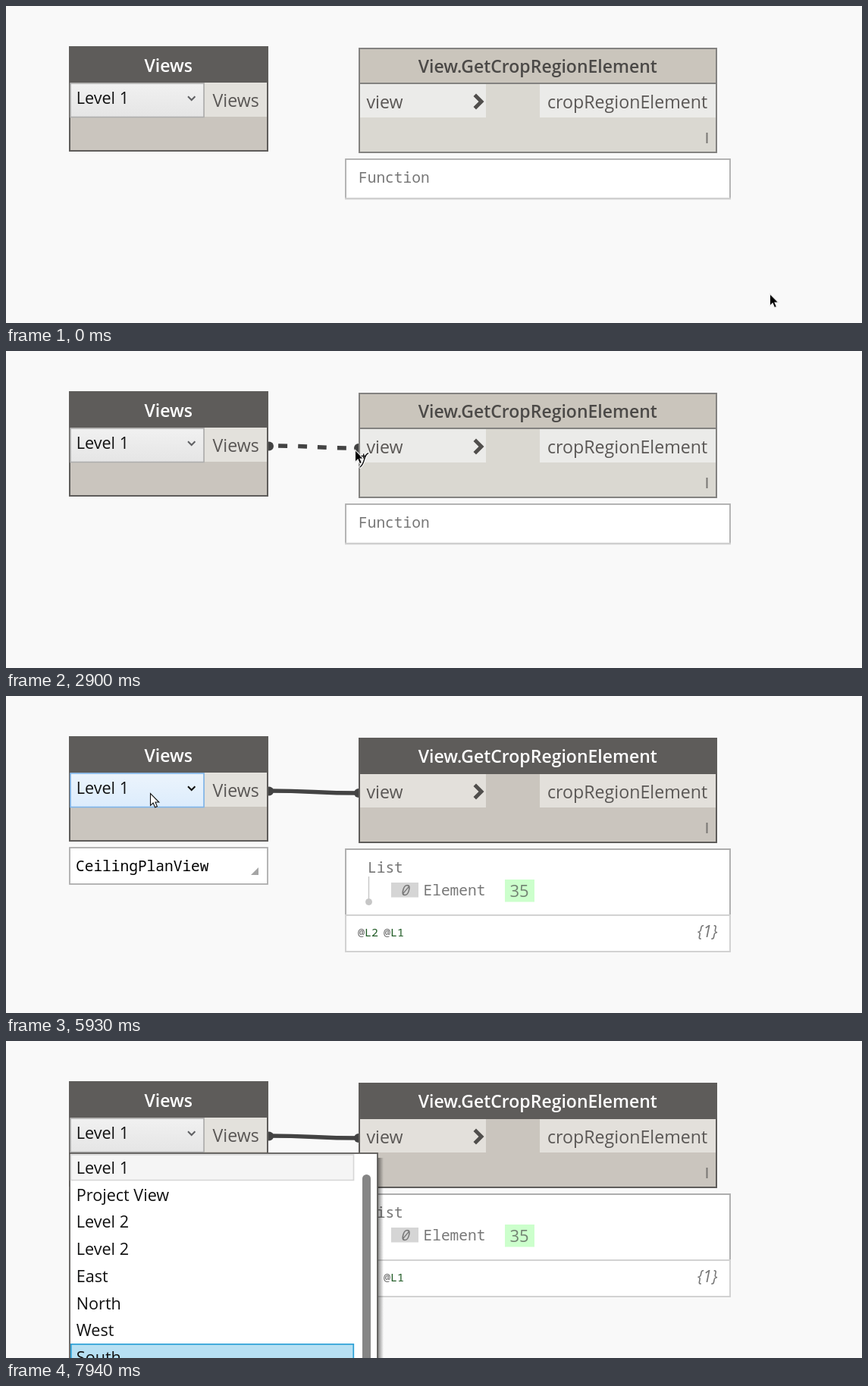
Write an HTML page that moves like this. It is 1129 by 418 pixels and loops after 8 s.

```html
<!DOCTYPE html>
<html lang="en">
<head>
<meta charset="utf-8">
<title>Crop region node graph</title>
<style>
  html, body { margin: 0; width: 100%; height: 100%; overflow: hidden; background: #f9f9f9; }
  svg { display: block; width: 100%; height: 100%; }
  text { font-family: "Open Sans", sans-serif; font-size: 23.2px; fill: #5a5755; white-space: pre; }
  .title { font-weight: 600; font-size: 23px; text-anchor: middle; fill: #fff; }
  .mono { font-family: "Noto Sans Mono", monospace; font-size: 19.5px; fill: #777; }
  .item { font-size: 21.6px; fill: #111; }
  .tip { font-size: 12px; fill: #555; }
  .level { font-size: 15px; fill: #1f5a24; }
</style>
</head>
<body>
<svg viewBox="0 0 1129 418" preserveAspectRatio="none">
  <defs>
    <linearGradient id="plain" x2="0" y2="1"><stop stop-color="#f1f1f1"/><stop offset="1" stop-color="#e5e5e5"/></linearGradient>
    <linearGradient id="lit" x2="0" y2="1"><stop stop-color="#ecf4fc"/><stop offset="1" stop-color="#dcecfc"/></linearGradient>
    <linearGradient id="shade"><stop stop-color="#000" stop-opacity=".5"/><stop offset="1" stop-color="#000" stop-opacity="0"/></linearGradient>
    <clipPath id="reveal"><rect id="revealBox" x="80" y="147" width="425" height="271"/></clipPath>
  </defs>
  <rect width="1129" height="418" fill="#f9f9f9"/>

  <g id="wire" stroke="#434343" fill="#434343">
    <path id="line" fill="none" stroke-width="5.5"/>
    <circle cx="347" cy="125.5" r="6" stroke="none"/>
    <circle id="endDot" cx="465" cy="128" r="6" stroke="none"/>
  </g>

  <g id="viewsNode">
    <rect x="84" y="54" width="261" height="137" fill="#cac5be" stroke="#5e5c5a" stroke-width="2"/>
    <rect x="83" y="53" width="263" height="48" fill="#5e5c5a"/>
    <text class="title" x="214.3" y="87">Views</text>
    <rect x="262" y="101" width="82" height="45" fill="#e3e1dc"/>
    <text x="272.5" y="133">Views</text>
    <rect id="combo" x="85" y="102" width="176" height="44.5" stroke-width="1.6"/>
    <text class="item" x="92.8" y="129">Level 1</text>
    <path id="comboArrow" d="M240 119.3l4.7 4.7 4.7-4.7" fill="none" stroke-width="2"/>
  </g>

  <g id="cropNode">
    <rect id="cropBody" x="466" y="56" width="471" height="137" stroke-width="2"/>
    <rect id="cropHead" x="467" y="57" width="469" height="45"/>
    <path id="cropRule" d="M466 102h471" stroke-width="2"/>
    <rect class="port" x="467" y="103" width="166" height="44"/>
    <rect class="port" x="704" y="103" width="232" height="44"/>
    <text id="cropTitle" class="title" x="701.3" y="88">View.GetCropRegionElement</text>
    <text x="475.5" y="135">view</text>
    <text x="714" y="135">cropRegionElement</text>
    <path d="M616.5 119l3.5-3.5 10.5 10.5-10.5 10.5-3.5-3.5 7-7z" fill="#504e4c"/>
    <path d="M924.5 167v14" stroke="#787673" stroke-width="2"/>
  </g>

  <g id="smallBubble">
    <rect x="448" y="202" width="507" height="52" fill="#fff" stroke="#adadad" stroke-width="1.8"/>
    <path d="M447 254h509" stroke="#cfcfcf" stroke-width="2.6"/>
    <text id="status" class="mono" x="465" y="233"></text>
  </g>

  <g id="bigBubble">
    <rect x="448" y="202" width="507" height="135" fill="#fff" stroke="#d2d2d2" stroke-width="2"/>
    <path d="M448 289V202H955V289" fill="none" stroke="#adadad" stroke-width="1.8"/>
    <path d="M447 289h509" stroke="#d2d2d2" stroke-width="2"/>
    <g id="tree">
      <text class="mono" x="477" y="233">List</text>
      <path class="branch" d="M478.5 238v30" stroke-width="1.4"/>
      <circle class="branch" cx="478.5" cy="271.5" r="4"/>
      <rect x="508" y="246" width="36" height="19.5" fill="#d5d5d5"/>
      <text class="mono" x="520" y="262.5" font-style="italic">0</text>
      <text class="mono" x="550.5" y="263">Element</text>
      <rect x="658" y="242" width="39" height="29.5" fill="#ccffcc"/>
      <text id="value" x="664.5" y="265" style="font-size:22px;fill:#728272"></text>
    </g>
    <text class="mono level" x="464" y="317"><tspan fill="#666">@</tspan>L2</text>
    <text class="mono level" x="498" y="317"><tspan fill="#666">@</tspan>L1</text>
    <text x="912" y="318" font-style="italic" style="font-size:21px;fill:#777">{1}</text>
    <g id="pin" fill="#fff">
      <rect x="874" y="207" width="57" height="38" rx="7" fill="#5e5c5a" stroke="#a9a8a7" stroke-width="2"/>
      <circle cx="885.5" cy="231" r="1.6"/><circle cx="891" cy="231" r="1.6"/><circle cx="896.5" cy="231" r="1.6"/>
      <path d="M908.5 215h12v2.5h-2v7q3.5 1.5 3.5 4.5h-6.3v7h-2.4v-7H907q0-3 3.5-4.5v-7h-2z"/>
    </g>
  </g>

  <g id="preview">
    <rect x="84" y="200" width="261" height="48" fill="#fff" stroke="#adadad" stroke-width="1.8"/>
    <path d="M333 226v10h-10z" fill="#a5a5a5"/>
    <text id="kind" class="mono" x="92" y="231" style="fill:#000">CeilingPlanView</text>
  </g>

  <g id="tooltip">
    <path d="M172.5 97.5h283v24l5.5 5.5-5.5 5.5v23h-283z" fill="#fff" fill-opacity=".62" stroke="#d4d4d4"/>
    <text class="tip" x="177" y="115">The view to obtain the crop region element from.</text>
    <text class="tip" x="176.5" y="148">Element</text>
  </g>

  <g id="popup" clip-path="url(#reveal)">
    <rect x="490" y="154" width="8" height="264" fill="url(#shade)"/>
    <rect x="84" y="148" width="406" height="290" fill="#fff" stroke="#5e5c5a" stroke-width="1.8"/>
    <rect x="85.5" y="150" width="373" height="33.5" fill="#f5f5f5" stroke="#d6d6d6" stroke-width="1.6"/>
    <rect id="hover" x="85.8" width="372.5" height="34.5" fill="#b7e0f3" stroke="#2ba0d6" stroke-width="1.7"/>
    <g id="items"></g>
    <rect x="470" y="176" width="11" height="260" rx="5.5" fill="#858585"/>
  </g>

  <g id="cursor">
    <path id="arrow" d="M.5.5V16.3L4.1 13l2.5 5.8 2.8-1.2L7 12h4.8z" stroke-width="1.1"/>
    <g id="pen" fill="none" stroke-linecap="round">
      <path d="M17.5 5C11.5 7 14 18 7 23M9 8.5h5.5M11.7 6v5" stroke="#fff" stroke-width="3.4"/>
      <path d="M17.5 5C11.5 7 14 18 7 23M9 8.5h5.5M11.7 6v5" stroke="#111" stroke-width="1.4"/>
    </g>
  </g>
</svg>
<script>
const LOOP = 8000;
const ROW_TOP = 149, ROW_H = 35.7;
const $ = id => document.getElementById(id);
const show = (id, on) => { $(id).style.display = on ? '' : 'none'; };
const set = (el, attrs) => { for (const k in attrs) el.setAttribute(k, attrs[k]); };
const within = (t, a, b) => t >= a && t < b;

const names = ['Level 1', 'Project View', 'Level 2', 'Level 2', 'East', 'North', 'West', 'South'];
$('items').innerHTML = names.map((n, i) =>
  `<text class="item" x="92.8" y="${175 + ROW_H * i}">${n}</text>`).join('');

// Pointer moves: first step time, last step time, steps, end x, end y
const moves = [
  [70, 70, 1, 984, 330],
  [510, 510, 1, 977, 323],
  [580, 580, 1, 984, 330],
  [1270, 1590, 5, 703, 78],
  [1820, 2050, 4, 358, 133],
  [2130, 2130, 1, 331, 143],
  [2590, 2900, 5, 460, 130],
  [3450, 3450, 1, 453, 132],
  [3920, 3980, 2, 453, 227],
  [4380, 4690, 5, 675, 255],
  [4920, 4920, 1, 601, 242],
  [5000, 5380, 6, 190, 128],
  [7330, 7410, 2, 160, 246],
  [7490, 7940, 7, 150, 420]
];

function pointer(t) {
  let x = 1007, y = 379;
  for (const [start, end, steps, toX, toY] of moves) {
    if (t < start) break;
    const gap = (end - start) / Math.max(1, steps - 1);
    const done = gap ? Math.min(steps, Math.floor((t - start) / gap + 1e-6) + 1) : 1;
    x += (toX - x) * done / steps;
    y += (toY - y) * done / steps;
  }
  return { x, y };
}

function drawWire(t, p) {
  const joined = t >= 3210, snapped = t >= 2820;
  show('wire', t >= 2590 && (joined || p.x > 346));
  show('endDot', snapped);
  const x = snapped ? 466 : p.x, y = snapped ? 128 : p.y;
  const mid = (346 + x) / 2;
  set($('line'), {
    d: `M346 125C${mid} 125 ${mid} ${y} ${x} ${y}`,
    'stroke-dasharray': joined ? 'none' : '12 14',
    'stroke-dashoffset': joined ? 0 : -13
  });
}

function drawCropNode(active) {
  const dark = '#5e5c5a';
  set($('cropBody'), { fill: active ? '#cac5be' : '#dad8d1', stroke: active ? dark : '#838280' });
  set($('cropHead'), { fill: active ? dark : '#cac5bc' });
  set($('cropRule'), { stroke: active ? dark : '#838280' });
  $('cropTitle').style.fill = active ? '#fff' : '#4b4947';
  document.querySelectorAll('.port').forEach(el => set(el, { fill: active ? '#e3e0db' : '#ebebe9' }));
}

function drawBubbles(t, p) {
  const open = t >= 3600;
  show('smallBubble', !open);
  show('bigBubble', open);
  $('status').textContent = t < 3450 ? 'Function' : 'List';
  show('tree', !within(t, 5780, 5930));
  show('pin', t >= 3980 && p.x > 447 && p.y > 201);
  const fresh = t >= 5930;
  $('value').textContent = fresh ? '35' : '31';
  set($('value'), { y: fresh ? 265 : 266 });
  const tint = fresh ? '#c6c6c6' : '#c0ccd6';
  document.querySelectorAll('.branch').forEach(el => set(el, { fill: tint, stroke: tint }));
  show('preview', within(t, 2670, 2830) || t >= 5610);
  show('kind', fresh);
}

function drawCombo(t, p) {
  const lit = t >= 5000 && within(p.x, 85, 262) && within(p.y, 101, 147);
  set($('combo'), { fill: `url(#${lit ? 'lit' : 'plain'})`, stroke: lit ? '#7eb4ea' : '#adadad' });
  set($('comboArrow'), { stroke: lit ? '#111' : '#5f6063' });
  show('popup', t >= 6860);
  set($('revealBox'), { height: t < 6930 ? 135 : 271 });
  const row = Math.max(0, Math.min(7, Math.floor((p.y - ROW_TOP) / ROW_H)));
  set($('hover'), { y: ROW_TOP + .9 + ROW_H * row });
}

function render(t) {
  const p = pointer(t);
  drawWire(t, p);
  drawCropNode(t >= 3210);
  drawBubbles(t, p);
  drawCombo(t, p);
  show('tooltip', within(t, 1970, 2130) || within(t, 3210, 3450));
  $('tooltip').style.opacity = within(t, 3210, 3280) ? .5 : 1;

  const white = t >= 3980;
  set($('cursor'), { transform: `translate(${p.x} ${p.y})` });
  set($('arrow'), { fill: white ? '#fff' : '#000', stroke: white ? '#111' : '#e8e8e8' });
  show('pen', within(t, 2360, 3210));
}

const began = performance.now();
function frame() {
  render((performance.now() - began) % LOOP);
  requestAnimationFrame(frame);
}
frame();
</script>
</body>
</html>
```
